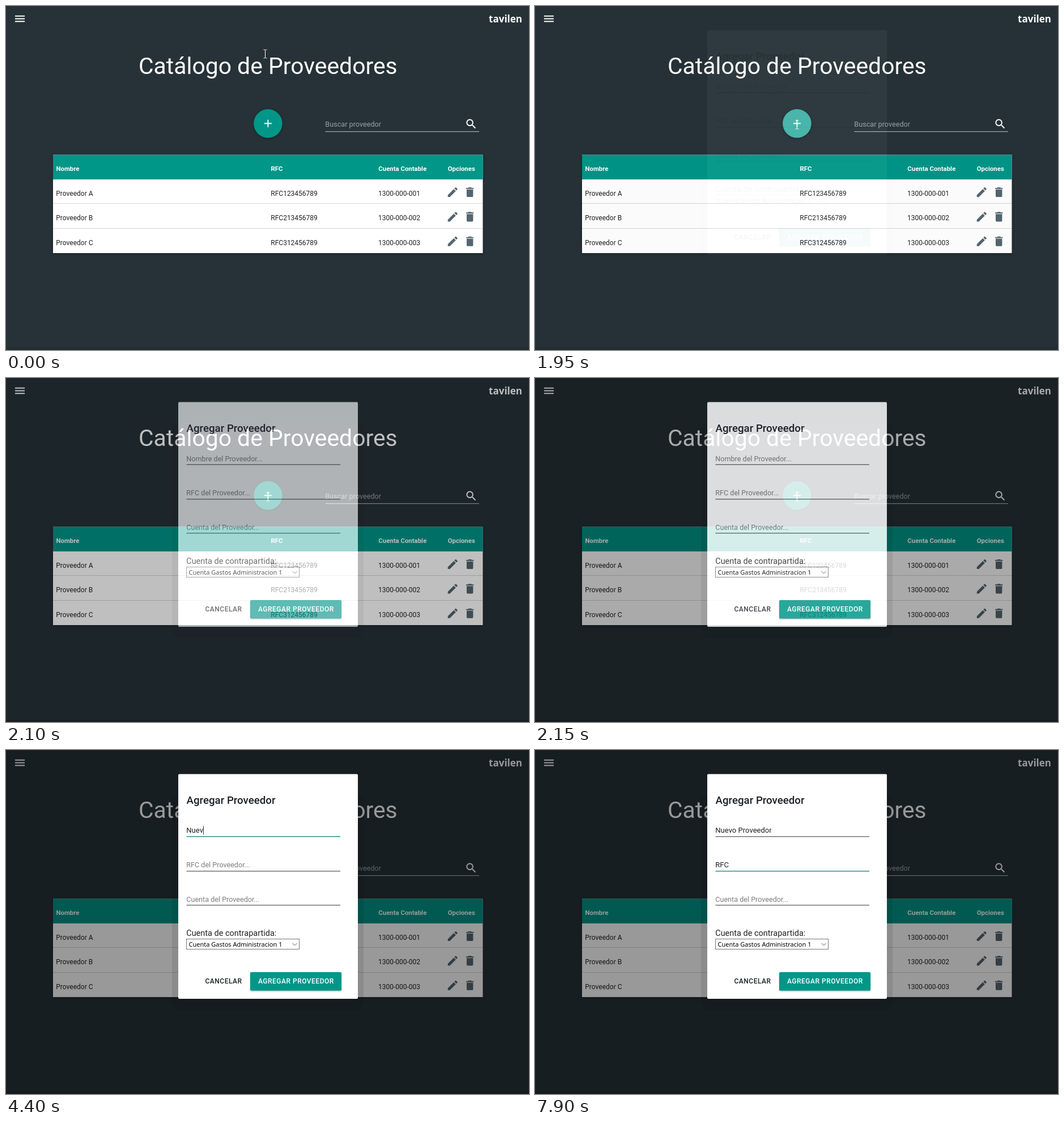
Animation, 923 px wide and 607 px high, one loop 8 s. Source, as an HTML page:

```html
<!DOCTYPE html>
<html lang="es">
<head>
<meta charset="utf-8">
<title>Catálogo de Proveedores</title>
<style>
  html, body { margin: 0; width: 100%; height: 100%; overflow: hidden; background: #263238; }
  svg { display: block; width: 923px; height: 607px; }
  text { font-family: Roboto, sans-serif; white-space: pre; }
  .bold { font-weight: 700; }
  .medium { font-weight: 500; }
  .caps { font-weight: 500; letter-spacing: .5px; }
  .brand { font-family: "Open Sans", "Noto Sans", sans-serif; font-weight: 700; text-anchor: end; }
  .select { font-family: "Noto Sans", sans-serif; }
  #fab { filter: drop-shadow(0 1px 2px rgba(0, 0, 0, .35)); }
  #submit { filter: drop-shadow(0 1px 1px rgba(0, 0, 0, .35)); }
</style>
</head>
<body>
<svg id="stage" viewBox="0 0 923 607"></svg>
<script>
const LOOP = 8000, TICK = 50, TEAL = '#009688';
const ICONS = {
  menu: 'M3 18h18v-2H3zm0-5h18v-2H3zm0-7v2h18V6z',
  add: 'M19 13h-6v6h-2v-6H5v-2h6V5h2v6h6z',
  search: 'M15.5 14h-.79l-.28-.27a6.5 6.5 0 1 0-.7.7l.27.28v.79l5 4.99L20.49 19zm-6 0a4.5 4.5 0 1 1 0-9 4.5 4.5 0 0 1 0 9z',
  edit: 'M3 17.25V21h3.75L17.81 9.94l-3.75-3.75zM20.71 7.04a1 1 0 0 0 0-1.41l-2.34-2.34a1 1 0 0 0-1.41 0l-1.83 1.83 3.75 3.75z',
  trash: 'M6 19a2 2 0 0 0 2 2h8a2 2 0 0 0 2-2V7H6zM19 4h-3.5l-1-1h-5l-1 1H5v2h14z'
};

const text = (x, y, size, str, fill = '#212121', cls = '') =>
  `<text x="${x}" y="${y}" font-size="${size}" fill="${fill}" class="${cls}">${str}</text>`;
const rect = (x, y, w, h, fill, extra = '') =>
  `<rect x="${x}" y="${y}" width="${w}" height="${h}" fill="${fill}" ${extra}/>`;
// Icons are drawn on a 24-unit grid around their centre
const icon = (name, cx, cy, fill, scale = .95) =>
  `<path d="${ICONS[name]}" fill="${fill}" transform="translate(${cx} ${cy}) scale(${scale}) translate(-12 -12)"/>`;

const row = (letter, i) => {
  const y = 306 + i * 43.4, code = ['123', '213', '312'][i];
  return (i ? rect(83, Math.round(y) - 1, 758, 1, '#d5d5d5') : '')
    + text(88.3, y + 28.9, 12, 'Proveedor ' + letter)
    + text(467.3, y + 28.9, 12, `RFC${code}456789`)
    + text(657, y + 28.9, 12, '1300-000-00' + (i + 1))
    + icon('edit', 788.3, y + 22.5, '#546670')
    + icon('trash', 818.7, y + 22.5, '#546670');
};

const field = (label, i) => {
  const y = 152 + i * 60.7;
  return text(318.3, y - 5.5, 12.6, label, '#7d7d7d', 'hint')
    + text(318.3, y - 6, 13.05, '', '#212121', 'value')
    + `<rect class="line" x="318.5" y="${Math.round(y)}" width="271.5" height="1.5"/>`
    + `<rect class="caret" y="${Math.round(y) - 18}" width="1" height="15" fill="#333"/>`;
};

const MODAL = 'M306 42.5H619Q621 42.5 621 44.5V437Q621 439 619 439H306Q304 439 304 437V44.5Q304 42.5 306 42.5z';

const stage = document.getElementById('stage');
stage.innerHTML = rect(0, 0, 923, 607, '#263238')
  + rect(0, 603, 923, 4, '#222c32')
  + icon('menu', 24.5, 22.5, '#fff')
  + text(911, 28.8, 17, 'tavilen', '#fff', 'brand')
  + text(234, 120, 40.88, 'Catálogo de Proveedores', '#fff')
  + `<g id="fab"><circle id="disc" cx="462.4" cy="207.3" r="25.3"/>
     <circle id="ripple" cx="462.4" cy="207.3" fill="#fff"/></g>`
  + icon('add', 462.4, 207.3, '#fff', .93)
  + text(563.3, 212.8, 12.65, 'Buscar proveedor', '#98a1a5')
  + rect(563.5, 221, 271.5, 1.2, '#a5acaf')
  + icon('search', 821, 208.2, '#fff', .96)
  + rect(83, 262.5, 758.5, 173.5, '#fff', 'style="filter:drop-shadow(0 1px 2px rgba(0,0,0,.3))"')
  + rect(83, 262.5, 758.5, 43.5, TEAL)
  + [['Nombre', 88.5], ['RFC', 467.5], ['Cuenta Contable', 657.3], ['Opciones', 779.7]]
    .map(([s, x]) => text(x, 291.3, 11.4, s, '#fff', 'bold')).join('')
  + ['A', 'B', 'C'].map(row).join('')
  + `<g id="dim" fill-rule="evenodd">
       <path d="M0 0H923V607H0z${MODAL}" opacity=".4"/>
       <path d="M293 80H631V440Q631 460 611 460H313Q293 460 293 440z${MODAL}" opacity=".09"/>
     </g>`
  + `<g id="modal"><path d="${MODAL}" fill="#fff"/>`
  + text(318.5, 95.2, 18.7, 'Agregar Proveedor', '#1c1f26', 'medium')
  + ['Nombre', 'RFC', 'Cuenta'].map((s, i) => field(s + ' del Proveedor...', i)).join('')
  + text(318.2, 327.7, 14.5, 'Cuenta de contrapartida:')
  + rect(318.5, 333.5, 199, 18, '#fff', 'stroke="#767676"')
  + text(322.5, 347, 11, 'Cuenta Gastos Administracion 1', '#000', 'select')
  + '<path d="M505.5 341l4 4 4-4" fill="none" stroke="#555"/>'
  + text(351.5, 412.4, 12, 'CANCELAR', '#1c1f26', 'caps')
  + rect(431, 392, 161, 32.5, TEAL, 'rx="2" id="submit"')
  + text(445, 412.4, 12, 'AGREGAR PROVEEDOR', '#fff', 'caps')
  + '</g>'
  + '<path id="cursor" d="M-3-7.5H-1L0-6.5 1-7.5H3M0-6.5V6.5M-3 7.5H-1L0 6.5 1 7.5H3" fill="none" stroke="#fff"/>';

const el = id => document.getElementById(id);
const all = cls => [...stage.querySelectorAll('.' + cls)];
const [hints, values, lines, carets] = ['hint', 'value', 'line', 'caret'].map(all);

const ramp = (t, a, b) => Math.min(1, Math.max(0, (t - a) / (b - a)));
const smooth = p => p * p * (3 - 2 * p);
const inOutQuad = p => p < .5 ? 2 * p * p : 1 - 2 * (1 - p) ** 2;
const mix = (a, b, p) => `rgb(${a.map((v, i) => Math.round(v + (b[i] - v) * p))})`;

const INPUTS = [
  { focus: 3100, blur: 6300, str: 'Nuevo Proveedor',
    keys: [3900, 4050, 4200, 4400, 4600, 4850, 5200, 5350, 5550, 5700, 5750, 5900, 6000, 6100, 6150] },
  { focus: 6300, blur: 7900, str: 'RFC', keys: [7200, 7450, 7800] }
];

// Cursor stops: time, x, y
const PATH = [[50, 457.5, 84.5], [950, 462.5, 209.5], [2150, 462.5, 209.5], [2450, 425.5, 143.5], [2750, 417.5, 142.5]];

function cursorAt(t) {
  let [, x, y] = PATH[0];
  for (let i = 1; i < PATH.length; i++) {
    const p = smooth(ramp(t, PATH[i - 1][0], PATH[i][0]));
    x += (PATH[i][1] - PATH[i - 1][1]) * p;
    y += (PATH[i][2] - PATH[i - 1][2]) * p;
  }
  return [x, y];
}

function drawInput({ focus, blur, str, keys }, i, t) {
  const count = keys.filter(k => k <= t).length;
  const last = count ? keys[count - 1] : focus;
  const active = t >= focus && t < blur;
  const glow = ramp(t, focus, focus + 300) * (i ? 1 : 1 - ramp(t, blur, blur + 300));
  values[i].textContent = str.slice(0, count);
  hints[i].setAttribute('opacity', count ? 0 : 1);
  lines[i].setAttribute('fill', mix([117, 117, 117], [45, 147, 136], glow));
  carets[i].setAttribute('x', Math.round(318.5 + (count ? values[i].getComputedTextLength() : 0)));
  carets[i].setAttribute('opacity', active && (t - last) % 900 < 450 ? 1 : 0);
}

function draw(t) {
  const open = inOutQuad(ramp(t, 1900, 2250));
  const leave = 1 - ramp(t, 1950, 2080);
  el('cursor').setAttribute('transform', `translate(${cursorAt(t).map(v => Math.floor(v) + .5)})`);
  el('disc').setAttribute('fill', mix([0, 150, 136], [38, 166, 154], ramp(t, 650, 950) * leave));
  el('ripple').setAttribute('r', 25.3 * smooth(ramp(t, 1400, 1700)));
  el('ripple').setAttribute('opacity', .133 * leave);
  el('dim').setAttribute('opacity', open);
  el('modal').setAttribute('opacity', open);
  INPUTS.forEach((input, i) => drawInput(input, i, t));
}

lines[2].setAttribute('fill', '#757575');
carets[2].setAttribute('opacity', 0);

const start = performance.now();
function frame() {
  const t = (performance.now() - start) % LOOP;
  draw(Math.floor(t / TICK) * TICK);
  requestAnimationFrame(frame);
}
frame();
</script>
</body>
</html>
```
